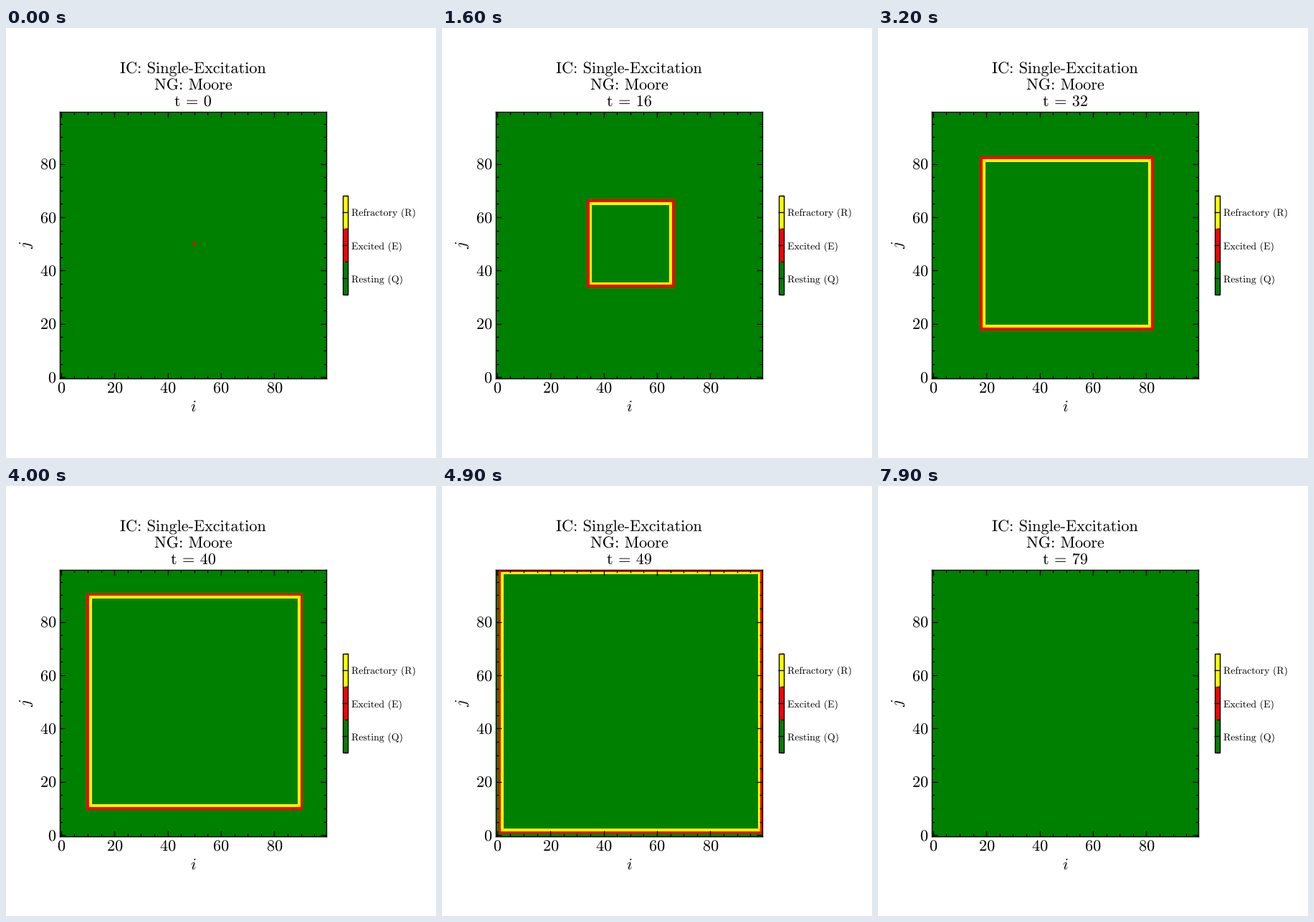
These frames come from a looping animation (600x600 px, 8000 ms). A matplotlib script:

```python
import math

import matplotlib.pyplot as plt
import numpy as np
from matplotlib.animation import FuncAnimation
from matplotlib.colors import BoundaryNorm, ListedColormap
from matplotlib.patches import PathPatch
from matplotlib.text import Text
from matplotlib.textpath import TextPath, text_to_path
from matplotlib.ticker import AutoMinorLocator, MultipleLocator
from matplotlib.transforms import Affine2D

STAGE, DPI = 600, 100
CELLS, CENTER, STEPS = 100, 50, 80
LARGE, SMALL = 16 * DPI / 72, 10 * DPI / 72   # em sizes in pixels

plt.rcParams.update({"mathtext.fontset": "cm", "axes.linewidth": 1})
for axis in ("xtick", "ytick"):
    plt.rcParams.update({
        f"{axis}.direction": "in",
        f"{axis}.major.size": 6, f"{axis}.major.width": 1,
        f"{axis}.minor.size": 3, f"{axis}.minor.width": 1,
    })

fig, ax = plt.subplots(figsize=(STAGE / DPI, STAGE / DPI), dpi=DPI,
                       facecolor="white")
to_pixels = Affine2D().scale(1 / STAGE) + fig.transFigure


def roman(text):
    """Upright text with word spaces of a third of an em."""
    words = (rf"\text{{{word}}}" for word in text.split(" "))
    return "$" + r"\hspace{0.38}".join(words) + "$"


def text_path(tex, x, y, size=LARGE, align=0.5, angle=0):
    """Outline of tex with its baseline at y, measured from the top."""
    prop = Text(fontsize=size).get_fontproperties()
    width = text_to_path.get_text_width_height_descent(tex, prop, True)[0]
    left = math.ceil(x - align * width - 0.05)
    place = Affine2D().rotate_deg(angle).translate(left, STAGE - y)
    return TextPath((0, 0), tex, prop=prop).transformed(place)


def label(*args, **kwargs):
    patch = PathPatch(text_path(*args, **kwargs), facecolor="black",
                      linewidth=0, transform=to_pixels)
    patch.set_snap(False)
    return fig.add_artist(patch)


def state(t):
    """0 resting, 1 excited, 2 refractory."""
    d = np.abs(np.arange(CELLS) - CENTER)
    ring = np.maximum.outer(d, d)
    return np.where(ring == t, 1, np.where(ring == t - 1, 2, 0))


def clock(t):
    return text_path(roman(f"t = {t}"), 261, 109)


bounds = [-0.5, 0.5, 1.5, 2.5]
image = ax.imshow(state(0), origin="lower", interpolation="nearest",
                  cmap=ListedColormap(["green", "red", "yellow"]),
                  norm=BoundaryNorm(bounds, 3))
for axis in (ax.xaxis, ax.yaxis):
    axis.set_major_locator(MultipleLocator(20))
    axis.set_minor_locator(AutoMinorLocator(4))
ax.tick_params(which="both", top=True, right=True,
               labelbottom=False, labelleft=False)

bar = fig.colorbar(image, ax=ax, shrink=0.3, ticks=[0, 1, 2])
bar.set_ticks(bounds, minor=True)
bar.ax.tick_params(which="both", labelright=False)

label(roman("IC: Single-Excitation"), 261, 63)
label(roman("NG: Moore"), 261, 86)
counter = label(roman("t = 0"), 261, 109)

for value in range(0, CELLS, 20):
    number = roman(str(value))
    offset = 3.72 * (value + 0.5)
    label(number, 75 + offset, 509)
    label(number, 70.14, round(496.7 - offset), align=1)
label("$i$", 261, 535)
label("$j$", 33, 308, align=0, angle=90)

for name, base in (("Refractory (R)", 262), ("Excited (E)", 309),
                   ("Resting (Q)", 355)):
    label(roman(name), 482, base, size=SMALL, align=0)


def update(t):
    image.set_data(state(t))
    counter.set_path(clock(t))
    return image, counter


anim = FuncAnimation(fig, update, frames=STEPS, interval=100,
                     repeat=True, repeat_delay=0)
plt.show()
```
